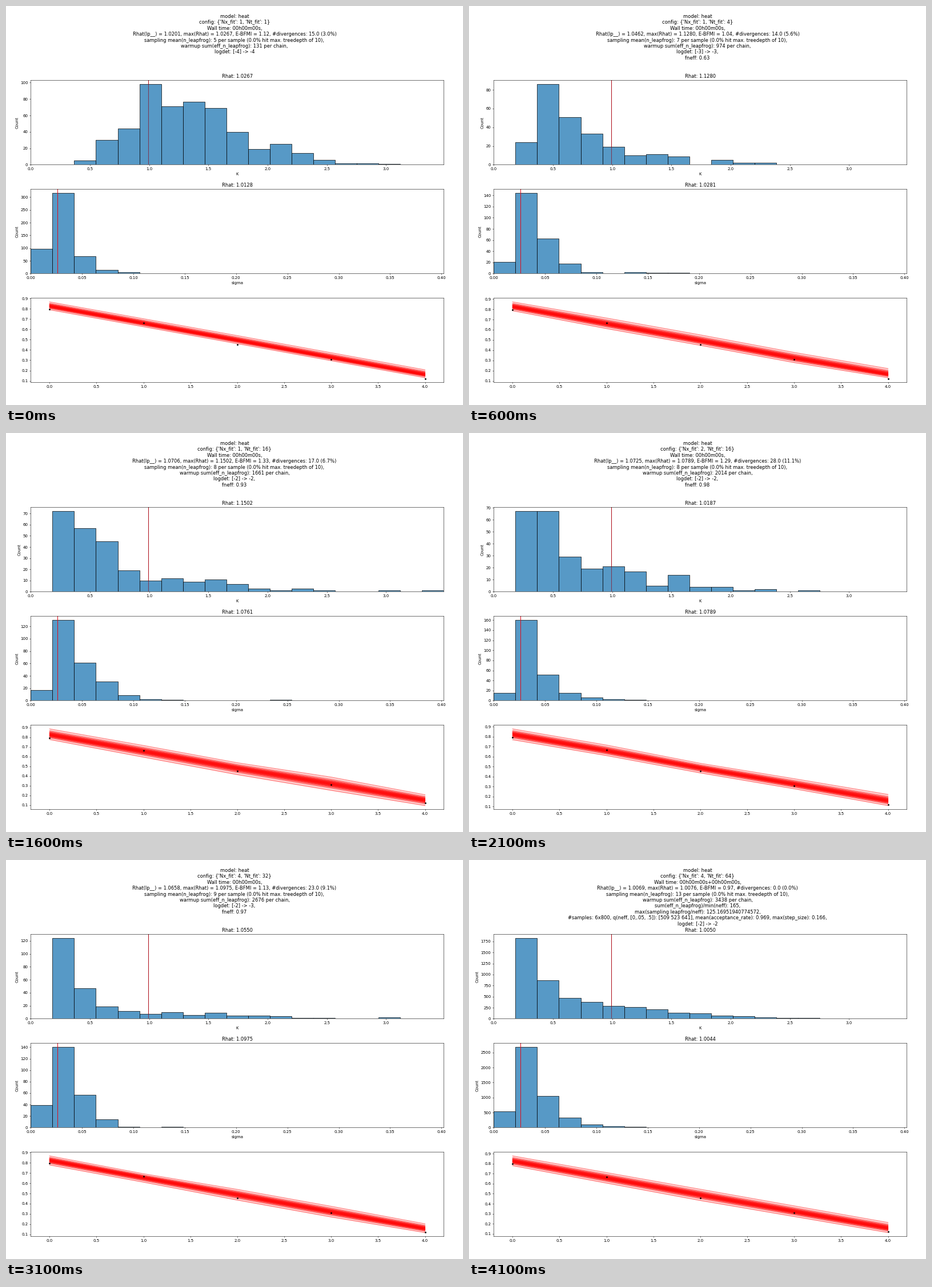
A matplotlib script that plays this animation: 800x700 px, repeating every 4.6 s.

```python
import numpy as np
import matplotlib.pyplot as plt
from matplotlib.animation import FuncAnimation

plt.rcParams["font.family"] = "DejaVu Sans"
W, H = 800, 700
BINS = 19
K_MAX, S_MAX = 3.488, 0.4023
K_TRUE, S_TRUE = 0.993, 0.0258
T = np.arange(5)
OBS = np.array([0.796, 0.665, 0.4545, 0.3105, 0.1215])
# Half-widths of the nested bands, relative to the outermost one
BANDS = [1, .66, .51, .41, .34, .27, .21, .15, .10, .05]


def padded(counts):
    return np.pad(np.array(counts, float), (0, BINS - len(counts)))


def over_time(vals):
    return np.interp(T, np.linspace(0, 4, len(vals)), vals)


def fit(k, sigma, upper, lower):
    return padded(k), padded(sigma), over_time(upper), over_time(lower)


def blend(a, b, total=252):
    hists = [np.rint(total * (p / p.sum() + q / q.sum()) / 2)
             for p, q in zip(a[:2], b[:2])]
    return (*hists, (a[2] + b[2]) / 2, (a[3] + b[3]) / 2)


def header(nx, nt, lp, top, bfmi, div, leaps, warm, logdet, fneff=None):
    lines = [
        "model: heat",
        f"config: {{'Nx_fit': {nx}, 'Nt_fit': {nt}}}",
        "Wall time: 00h00m00s,",
        f"Rhat(lp__) = {lp}, max(Rhat) = {top}, E-BFMI = {bfmi}, #divergences: {div}",
        f"sampling mean(n_leapfrog): {leaps} per sample (0.0% hit max. treedepth of 10),",
        f"warmup sum(eff_n_leapfrog): {warm} per chain,",
        f"logdet: {logdet}" + ("," if fneff else ""),
    ]
    if fneff:
        lines.append(f"fneff: {fneff}")
    return "\n".join(lines)


LONG_HEADER = "\n".join([
    "model: heat",
    "config: {'Nx_fit': 4, 'Nt_fit': 64}",
    "Wall time: 00h00m00s+00h00m00s,",
    "Rhat(lp__) = 1.0069, max(Rhat) = 1.0076, E-BFMI = 0.97, #divergences: 0.0 (0.0%)",
    "sampling mean(n_leapfrog): 13 per sample (0.0% hit max. treedepth of 10),",
    "warmup sum(eff_n_leapfrog): 3438 per chain,",
    "sum(eff_n_leapfrog)/min(neff): 165,",
    "max(sampling leapfrog/neff): 125.16951940774572,",
    "#samples: 6x800, q(neff, [0,.05, .5]): [509 523 641], "
    "mean(acceptance_rate): 0.969, max(step_size): 0.166,",
    "logdet: [-2] -> -2",
])

nt1 = fit([0, 0, 5, 30, 44, 98, 71, 77, 69, 40, 19, 25, 14, 6, 2, 2, 1],
          [98, 316, 69, 14, 5, 2],
          [.868, .540, .207], [.791, .461, .130])
nt4 = fit([0, 24, 86, 51, 33, 19, 10, 11, 9, 0, 5, 2, 2],
          [21, 144, 63, 18, 2, 0, 2, 1, 1],
          [.873, .715, .550, .378, .220], [.786, .611, .447, .278, .130])
nt16 = fit([0, 72, 57, 45, 19, 10, 12, 9, 11, 7, 3, 1, 3, 1, 0, 0, 1, 0, 1],
           [17, 130, 61, 31, 9, 2, 1, 0, 0, 0, 0, 1],
           [.887, .716, .538, .390, .208], [.777, .595, .415, .253, .096])
nx2 = fit([0, 67, 67, 29, 19, 21, 17, 5, 14, 4, 4, 1, 2, 0, 1],
          [15, 160, 51, 15, 6, 3, 2],
          [.879, .717, .534, .380, .222], [.770, .611, .437, .278, .110])
nx4 = fit([0, 72, 59, 32, 26, 8, 18, 10, 9, 13, 9, 2, 3, 0, 0, 0, 1, 1],
          [26, 154, 53, 21, 6, 1, 1, 0, 1, 0, 0, 0, 1],
          [.881, .718, .545, .378, .208], [.778, .603, .435, .270, .108])
nt32 = fit([0, 124, 47, 19, 12, 7, 10, 6, 9, 5, 5, 4, 1, 1, 0, 0, 2],
           [39, 140, 57, 14, 1, 0, 1],
           [.867, .693, .540, .375, .204], [.778, .610, .435, .270, .118])
full = fit([10, 1820, 870, 475, 385, 290, 260, 210, 140, 120, 75, 55, 30, 22, 15, 6, 5, 4],
           [545, 2678, 1050, 335, 105, 50, 20, 12, 3],
           [.878, .545, .213], [.780, .432, .112])
nt2 = (padded([0, 4, 62, 104, 86, 70, 52, 41, 30, 22, 12, 8, 5, 2, 1, 1]),
       *blend(nt1, nt4, 500)[1:])

# (header, Rhat of K, Rhat of sigma, fit)
STEPS = [
    (header(1, 1, "1.0201", "1.0267", "1.12", "15.0 (3.0%)", 5, 131, "[-4] -> -4"),
     "1.0267", "1.0128", nt1),
    (header(1, 2, "1.0318", "1.0412", "1.08", "11.0 (2.2%)", 6, 542, "[-3] -> -3", "0.52"),
     "1.0412", "1.0207", nt2),
    (header(1, 4, "1.0462", "1.1280", "1.04", "14.0 (5.6%)", 7, 974, "[-3] -> -3", "0.63"),
     "1.1280", "1.0281", nt4),
    (header(1, 8, "1.0584", "1.1316", "1.18", "16.0 (6.3%)", 7, 1313, "[-3] -> -2", "0.84"),
     "1.1316", "1.0495", blend(nt4, nt16)),
    (header(1, 16, "1.0706", "1.1502", "1.33", "17.0 (6.7%)", 8, 1661, "[-2] -> -2", "0.93"),
     "1.1502", "1.0761", nt16),
    (header(2, 16, "1.0725", "1.0789", "1.29", "28.0 (11.1%)", 8, 2014, "[-2] -> -2", "0.98"),
     "1.0187", "1.0789", nx2),
    (header(4, 16, "1.0950", "1.1090", "1.00", "24.0 (9.1%)", 8, 2330, "[-2] -> -2", "0.95"),
     "1.0857", "1.1090", nx4),
    (header(4, 32, "1.0658", "1.0975", "1.13", "23.0 (9.1%)", 9, 2676, "[-2] -> -3", "0.97"),
     "1.0550", "1.0975", nt32),
    (header(4, 64, "1.0712", "1.0934", "1.08", "19.0 (7.5%)", 9, 3016, "[-2] -> -2", "0.96"),
     "1.0934", "1.0621", blend(nt32, full)),
    (LONG_HEADER, "1.0050", "1.0044", full),
]

fig = plt.figure(figsize=(16, 14), dpi=50, facecolor="white")
title = fig.suptitle("")


def panel(top):
    left, right, height = 43.3, 766.4, 148.1
    return fig.add_axes([left / W, 1 - (top + height) / H, (right - left) / W, height / H])


ax_k, ax_s, ax_fit = (panel(130.3 + 191 * i) for i in range(3))


def draw_hist(ax, counts, x_max, name, rhat):
    ax.clear()
    width = x_max / BINS
    ax.bar(np.arange(BINS) * width, counts, width, align="edge",
           facecolor=(31 / 255, 119 / 255, 180 / 255, 0.75), edgecolor="k", linewidth=1)
    ax.set(xlim=(0, x_max), ylim=(0, counts.max() * 1.05),
           xlabel=name, ylabel="Count", title=f"Rhat: {rhat}")


def draw_ribbon(ax, upper, lower):
    ax.clear()
    mid = ((upper + lower) / 2 + 0.826 - 0.1675 * T) / 2
    for w in BANDS:
        hi, lo = mid + w * (upper - mid), mid + w * (lower - mid)
        ax.fill_between(T, lo, hi, color="r", alpha=0.18, linewidth=0)
        for edge in (lo, hi):
            ax.plot(T, edge, color="r", alpha=0.5, lw=1.5)
    ax.plot(T, OBS, "k.", ms=6)
    low, high = min(lower.min(), OBS.min()), upper.max()
    pad = 0.05 * (high - low)
    ax.set(xlim=(-0.2, 4.2), ylim=(low - pad, high + pad))


def update(n):
    # The first step lasts one tick, all others five
    text, rhat_k, rhat_s, (k, sigma, upper, lower) = STEPS[(n + 4) // 5]
    title.set_text(text)
    draw_hist(ax_k, k, K_MAX, "K", rhat_k)
    ax_k.axvline(K_TRUE, color="#b01420", lw=1.5, zorder=0.5)
    ax_k.axvline(K_TRUE, color="#b01420", lw=1.5, alpha=0.5)
    draw_hist(ax_s, sigma, S_MAX, "sigma", rhat_s)
    ax_s.axvline(S_TRUE, color="#dc1020", lw=1.5)
    draw_ribbon(ax_fit, upper, lower)
    return []


anim = FuncAnimation(fig, update, frames=46, interval=100, init_func=lambda: [],
                     repeat=True, repeat_delay=0, blit=False)
plt.show()
```
